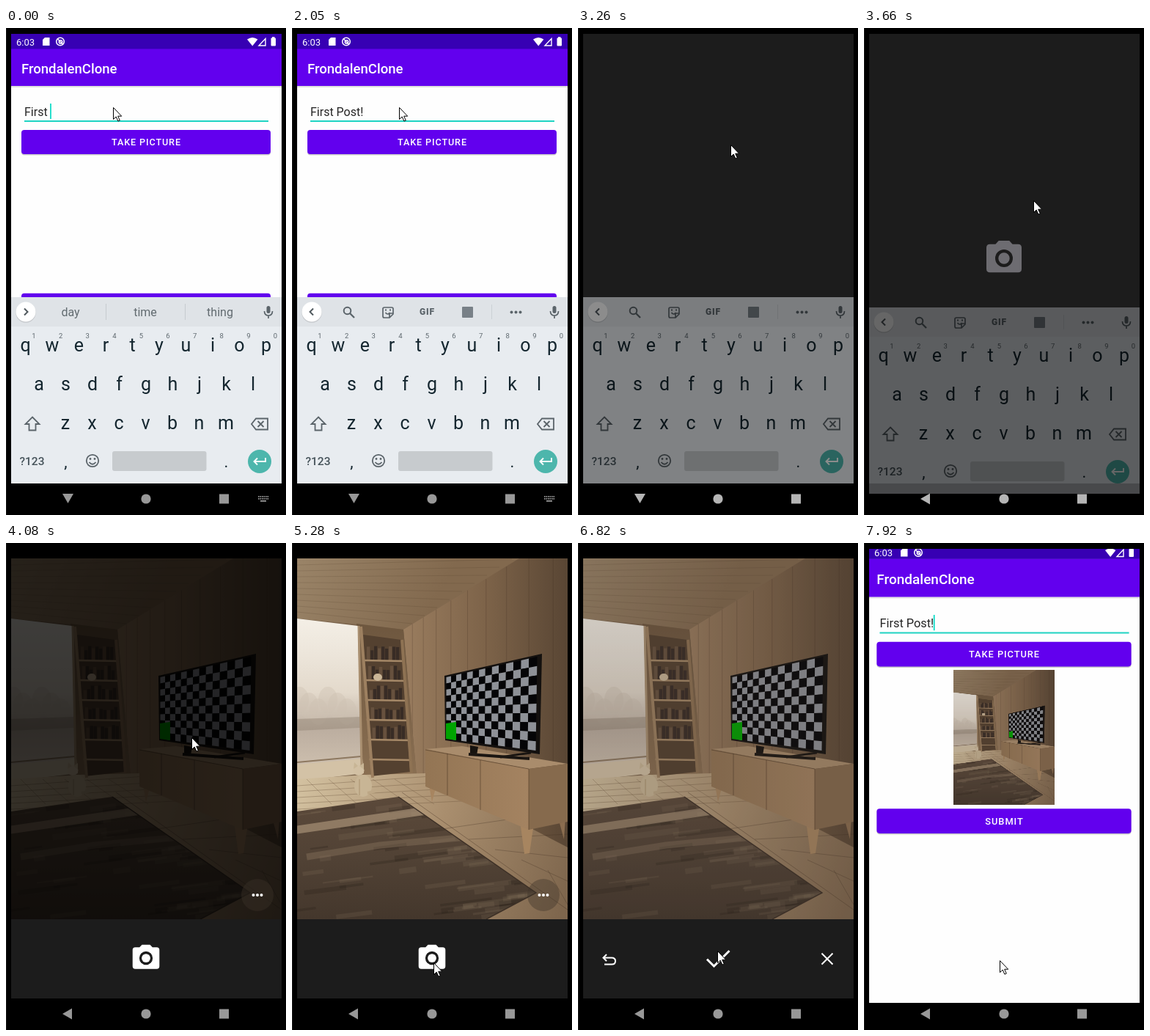
Write an HTML page with a canvas that moves like this. It is 382x664 px and loops after 8 s.

```html
<!DOCTYPE html>
<html>
<head>
<meta charset="utf-8">
<style>
html, body { margin: 0; width: 100%; height: 100%; overflow: hidden; background: #000 }
canvas { display: block }
</style>
</head>
<body>
<canvas id="stage" width="382" height="664"></canvas>
<script>
const stage = document.getElementById('stage').getContext('2d');
let c = stage;

// ---------- helpers ----------
function fill(d, color) { c.fillStyle = color; c.fill(new Path2D(d)); }
function poly(points, color) { fill('M' + points + 'z', color); }
function line(d, color, width = 1) {
  c.strokeStyle = color;
  c.lineWidth = width;
  c.stroke(new Path2D(d));
}
function rect(x, y, w, h, color, r = 0) {
  c.fillStyle = color;
  c.beginPath();
  c.roundRect(x, y, w, h, r);
  c.fill();
}
function disc(x, y, r, color, ry = r) {
  c.fillStyle = color;
  c.beginPath();
  c.ellipse(x, y, r, ry, 0, 0, 7);
  c.fill();
}
function ring(x, y, r, color, width) {
  c.strokeStyle = color;
  c.lineWidth = width;
  c.beginPath();
  c.arc(x, y, r, 0, 7);
  c.stroke();
}
function text(s, x, y, size, color, align = 'center', weight = 400, spacing = 0) {
  c.font = `${weight} ${size}px Roboto, sans-serif`;
  c.letterSpacing = spacing + 'px';
  c.textAlign = align;
  c.fillStyle = color;
  c.fillText(s, x, y);
}
function shade(x0, y0, x1, y1, ...colors) {
  const g = c.createLinearGradient(x0, y0, x1, y1);
  colors.forEach((color, i) => g.addColorStop(i / (colors.length - 1), color));
  return g;
}
function group(fn, { scale = 1, dy = 0, alpha = 1, clip } = {}) {
  c.save();
  c.globalAlpha *= alpha;
  if (clip) c.clip(new Path2D(clip));
  c.translate(191, 340 + dy);
  c.scale(scale, scale);
  c.translate(-191, -340);
  fn();
  c.restore();
}
// linear interpolation through rows of [time, ...values]
function track(rows, t) {
  const i = rows.findLastIndex(r => r[0] <= t), a = rows[i], b = rows[i + 1] || a;
  const k = a === b ? 0 : (t - a[0]) / (b[0] - a[0]);
  return a.slice(1).map((v, j) => v + (b[j + 1] - v) * k);
}
let seed = 7;
const random = () => (seed = seed * 16807 % 2147483647) / 2147483647;

// ---------- room seen by the camera ----------
function paintRoom() {
  rect(7, 21, 369, 492, '#7a634b');
  poly('7,21 310,21 152,118 90,111 7,103', shade(7, 21, 180, 110, '#9a8468', '#82694e'));
  for (let i = 0; i < 9; i++)
    line(`M7,${30 + i * 8}L${300 - i * 17},${22 + i * 11}`, 'rgba(70,52,36,.16)');
  poly('152,118 310,21 376,21 376,440 170,318', shade(152, 0, 376, 0, '#9a7d5f', '#7d6349', '#594634'));
  for (let i = 1; i < 10; i++) {
    const x = 152 + i * i * 1.3 + i * 11;
    line(`M${x},${118 - (x - 152) * .61}V330`, 'rgba(55,40,27,.22)');
  }
  poly('88,110 152,118 170,318 95,325', shade(0, 110, 0, 320, '#6e573f', '#8a6f52'));

  // window
  poly('7,103 90,113 94,305 7,312', shade(0, 103, 0, 305, '#f4efe6', '#ece5da', '#e3d9cb', '#bcaea0', '#cdbfae'));
  for (let i = 0; i < 6; i++) disc(10 + i * 13, 214 + i % 3 * 8, 13, 'rgba(205,192,177,.4)', 18);
  poly('7,240 92,237 93,252 7,256', 'rgba(150,135,120,.5)');
  line('M7,299L94,291', '#8d7860', 2);
  poly('7,302 96,294 98,314 7,325', '#d3c2a6');
  line('M91,113L95,305', '#a98f70', 3);

  // floor
  poly('7,322 100,316 182,314 376,415 376,513 7,513', shade(7, 340, 376, 480, '#d2c09f', '#a98e6e', '#7e664d'));
  for (let i = 0; i < 5; i++) {
    line(`M7,${331 + i * 8}L${190 + i * 20},${318 + i * 8}`, 'rgba(100,78,55,.35)');
    line(`M${20 + i * 30},322l${34 + i * 5},34`, 'rgba(100,78,55,.3)');
    line(`M${205 + i * 36},${390 + i * 14}L376,${365 + i * 32}`, 'rgba(60,43,30,.3)');
  }
  line('M150,340L376,500', 'rgba(70,50,35,.4)');

  // rug
  c.save();
  c.clip(new Path2D('M7,366L145,346 333,477 265,513H7z'));
  rect(7, 340, 330, 175, shade(0, 346, 0, 513, '#5b493a', '#514235', '#44372c'));
  for (let i = 0; i < 90; i++) {
    const x = random() * 320, y = 350 + random() * 165, w = 15 + random() * 60;
    line(`M${x},${y}l${w},${-w * .13}`, i % 3 ? 'rgba(145,122,98,.16)' : 'rgba(38,29,22,.25)', 2 + random() * 6);
  }
  line('M0,392L75,381 190,364', 'rgba(190,167,136,.55)', 11);
  line('M20,428L120,412 250,400', 'rgba(160,137,110,.3)', 9);
  c.restore();
  line('M145,346L333,477 265,513', '#3d3026', 1.5);

  // ladder shelf
  poly('97,125 149,132 161,312 108,318', '#544130');
  for (let i = 0; i < 6; i++) {
    const y = 160 + i * 27, x = 99 + i * 1.9;
    for (let b = 0; b < 9 && i < 5; b++) {
      const h = 13 + random() * 7;
      rect(x + 3 + b * 5, y - h, 4.3, h, b % 3 ? '#382c25' : '#67513e');
    }
    line(`M${x - 3},${y}L${x + 54},${y + 1}`, '#a58867', 2.5);
  }
  disc(117, 183, 6, '#c9b597', 5);
  line('M94,114L110,320', '#9d8060', 4);
  line('M150,132L163,314', '#8e7253', 4);

  // cat
  disc(97, 331, 12, '#c8b595', 15);
  disc(91, 310, 7.5, '#d2c0a3', 7);
  poly('84,308 85,299 90,304', '#c8b595');
  poly('92,304 98,300 98,309', '#c8b595');
  line('M103,341Q114,339 121,334', '#bda786', 4);
  line('M92,322V344', '#a9916f');

  // sideboard
  poly('187,330 196,334 191,353', '#a78560');
  poly('312,386 329,389 324,423 317,424', '#a78560');
  poly('364,378 373,376 371,404', '#8b6d4f');
  poly('182,281 232,277 376,301 323,308', '#a98c6c');
  poly('182,281 323,308 323,391 182,332', shade(182, 0, 323, 0, '#937554', '#a48361'));
  poly('323,308 376,301 376,380 323,391', '#866a4d');
  line('M212,287V344M257,296V364M182,282L323,308V391', 'rgba(65,46,30,.5)');

  // television
  poly('243,276 254,278 252,289 243,287', '#17130f');
  line('M241,288L324,294', '#1b1612', 4);
  line('M284,292L326,286', '#1b1612', 3);
  poly('208,181 341,151 338,288 209,269', '#14110f');
  const at = (u, v) => {
    const w = .72 * u + .28 * u * u, top = 183 - 28 * w, bottom = 267 + 16 * w;
    return `${210.5 + 124 * w - 2 * w * v},${top + (bottom - top) * v} `;
  };
  const cols = 14, rows = 10;
  for (let i = 0; i < cols; i++)
    for (let j = 0; j < rows; j++) {
      const u = i / cols, v = j / rows, u2 = (i + 1) / cols, v2 = (j + 1) / rows;
      poly(at(u, v) + at(u2, v) + at(u2, v2) + at(u, v2), (i + j) % 2 ? '#050507' : '#8e9197');
    }
  poly('210,246 224,244 224,269 210,267', '#00a400');
}
const room = document.createElement('canvas');
room.width = 369;
room.height = 492;
c = room.getContext('2d');
c.translate(-7, -21);
paintRoom();
c = stage;

function photo(x, y, w, h, veil) {
  c.drawImage(room, x, y, w, h);
  rect(x, y, w, h, `rgba(62,54,48,${veil})`);
}

// ---------- app ----------
function button(label, y, pressed) {
  rect(21, y + 1, 340, 33.5, 'rgba(0,0,0,.2)', 4);
  rect(21, y, 340, 33, '#6200ee', 4);
  if (pressed) group(() => disc(196, 159, 145, 'rgba(255,255,255,.22)'), { clip: `M21,${y}h340v33h-340z` });
  text(label, 191.5, y + 21, 12.6, '#fff', 'center', 500, .9);
}
function app({ entry = 'First Post!', caret = false, pressed = false, picture = false }) {
  rect(7, 8, 369, 613, '#fefefe');
  rect(7, 79, 369, 2, 'rgba(0,0,0,.12)');
  rect(7, 28, 369, 51, '#6200ee');
  rect(7, 8, 369, 20.5, '#3700b3');
  text('FrondalenClone', 21, 61.5, 18.6, '#fff', 'left', 500);
  text(entry, 25, 120, 16, '#252525', 'left');
  if (caret) rect(25 + c.measureText(entry).width - .5, 103, 1.7, 21, '#03dac5');
  rect(25, 126, 333, 2, '#1fd3c3');
  button('TAKE PICTURE', 139, pressed);
  if (picture) photo(123.5, 176.5, 135, 180, .16);
  button('SUBMIT', 361.7);
}
function statusBar(y) {
  text('6:03', 14, y + 5, 13, '#fff', 'left');
  fill(`M53,${y - 5.5}h6.5v11h-9.5v-8z`, '#fff');
  ring(74, y, 5.3, '#fff', 1.5);
  ring(74.5, y + .5, 2.2, '#fff', 1.5);
  line(`M70,${y - 4}l8,8`, '#fff', 1.5);
  fill(`M329,${y - 3}q7.2,-5 14.4,0l-7.2,9z`, '#fff');
  line(`M354,${y - 4}v9.5h-9z`, '#fff', 1.4);
  rect(361.5, y - 5, 6.5, 11, '#fff', 1);
  rect(363, y - 6.3, 3.5, 2, '#fff');
}

// ---------- keyboard ----------
const INK = '#5b646a';
function suggestions(words) {
  words.forEach((word, i) => text(word, 88 + i * 102, 393, 16, '#626b70'));
  line('M136.5,376v22M244.5,376v22', '#c6cbcf');
}
function tools() {
  ring(75.5, 385.5, 4.8, INK, 2);
  line('M79,389l6,6', INK, 2.3);
  line('M126,381h10q2,0 2,2v7l-5,5h-7q-2,0 -2,-2v-10q0,-2 2,-2M138,389h-5v6M127.500,388q3,4 6,0', INK, 1.7);
  rect(127, 383.500, 2, 2, INK);
  rect(133, 383.500, 2, 2, INK);
  text('GIF', 184.5, 391, 12, INK, 'center', 900, .9);
  rect(232, 380, 15, 15, '#788087', 1);
  line('M272.5,377v20', '#ccd1d5');
  [299.5, 305.5, 311.5].forEach(x => disc(x, 387.5, 2, INK));
}
function keyboard(words, toolAlpha) {
  rect(7, 367, 369, 254, '#e8ecf0');
  rect(7, 367, 369, 40, '#dfe3e7');
  disc(27, 388, 13.7, 'rgba(0,0,0,.13)');
  disc(27, 387, 13.5, '#fff');
  line(toolAlpha ? 'M29,382.500l-4.500,4.500 4.500,4.500' : 'M25,382.500l4.500,4.500 -4.500,4.500', '#50595e', 2);
  if (toolAlpha) group(tools, { alpha: toolAlpha });
  else suggestions(words);
  rect(355.5, 379, 5, 10, INK, 2.5);
  line('M352.500,386q0,6 5.500,6t5.500,-6M358,392v4', INK, 1.7);

  const row = (keys, x, y) => [...keys].forEach((k, i) => text(k, x + i * 36.5, y, 25, '#14262f'));
  row('qwertyuiop', 26.5, 441);
  row('asdfghjkl', 45, 494);
  row('zxcvbnm', 81, 547);
  [...'1234567890'].forEach((n, i) => text(n, 38 + i * 36.6, 423, 9.5, '#5e686e'));
  line('M36,530.500l9.500,9.500h-5v8.500h-9v-8.500h-5z', INK, 1.8);
  line('M341,532.500h16v15h-16l-6,-7.500zM343.500,536l8,8M351.500,536l-8,8', INK, 1.8);
  text('?123', 35.5, 596, 15.5, '#46535a', 'center', 500);
  text(',', 81.5, 599, 22, '#14262f');
  text('.', 300.5, 599, 22, '#14262f');
  ring(118, 590, 8.2, INK, 1.8);
  disc(115, 587.5, 1.4, INK);
  disc(121, 587.5, 1.4, INK);
  line('M113.500,592q4.500,5.500 9,0', INK, 1.8);
  rect(145, 577, 128.5, 27, '#c7cbce', 3);
  disc(346, 591, 16, '#4db6ac');
  line('M354,586v5h-15M343,586.500l-4.500,4.500 4.500,4.500', '#fff', 1.9);
}

// ---------- camera ----------
const DARK = '#1c1c1c';
function cameraIcon(y, k, color) {
  c.save();
  c.translate(191, y);
  c.scale(k, k);
  fill('M-3,-10L-4.830,-8H-8q-2,0 -2,2V6q0,2 2,2H8q2,0 2,-2V-6q0,-2 -2,-2H4.830L3,-10z', color);
  disc(0, 0, 5, DARK);
  disc(0, 0, 3.2, color);
  c.restore();
}
function reviewIcons() {
  line('M39,561l-4.500,4.500 4.500,4.500M35,565.500h11q5,0 5,4.500t-5,4.500h-10', '#fff', 2);
  line('M176,567.500l9.500,9.500 21,-21', '#fff', 3);
  line('M332.500,559.500l15,15M347.500,559.500l-15,15', '#fff', 2);
}
function camera(t) {
  const [preview, shutter, review] = track(
    [[4080, .25, 1, 0], [4470, 1, 1, 0], [5700, 1, 1, 0], [6070, 1, 0, 0], [6220, 1, 0, .3], [6460, 1, 0, 1]], t);
  rect(7, 8, 369, 613, '#000');
  rect(7, 513, 369, 108, DARK);
  group(() => photo(7, 21, 369, 492, .2 * (1 - shutter)), { alpha: preview });
  if (shutter) group(() => {
    cameraIcon(566, 1.83, '#fff');
    disc(343, 480, 22, 'rgba(60,50,42,.4)');
    [337.5, 343, 348.5].forEach(x => disc(x, 480, 2, '#fff'));
  }, { alpha: shutter });
  if (review) group(reviewIcons, { alpha: review });
}
function openCamera(t, keys) {
  const [scale, size, dim, dy] = track(
    [[2990, 1.0456, .984, .2, 0], [3110, 1.046, 1, .35, 0], [3260, 1, 1, .45, 0],
     [3410, 1, 1, .52, 6], [3660, 1, 1, .6, 14], [3810, 1, 1, .82, 22]], t);
  group(() => app({}), { scale });
  rect(7, 8, 369, 626, 'rgba(0,0,0,.3)');
  group(() => rect(7, 8, 369, t < 3260 ? 626 : 613, DARK), { scale: size });
  if (t < 3260) statusBar(18.5);
  if (t >= 3410) cameraIcon(314, 2.4, '#6d6c71');
  if (t < 3930) group(() => {
    keys();
    rect(7, 367, 369, 254, `rgba(0,0,0,${dim})`);
  }, { scale, dy });
  if (t >= 3410) rect(7, 621, 369, 43, 'rgba(0,0,0,.22)');
}

// ---------- system ----------
function navBar(t) {
  const gray = t > 2900 && t < 4080 ? '#b5b5b5' : '#989898';
  if (t < 3410) poly('77,635 92,635 84.5,648', gray);
  else poly('77,642 90,634.5 90,649.5', gray);
  disc(191, 642, 6.6, gray);
  rect(291, 635.5, 13, 13, gray);
  if (t < 3260)
    for (let i = 0; i < 13; i++)
      i < 12 ? rect(344 + i % 6 * 2.5, 638 + (i / 6 | 0) * 3, 1.6, 1.8, gray) : rect(347, 644, 8, 1.8, gray);
}
const MOUSE = [
  [0, 146, 108], [2050, 146, 108], [2170, 257, 154], [2320, 240, 160], [2440, 220, 162], [2560, 208, 159],
  [3410, 208, 159], [3660, 231, 235], [3930, 253, 265], [4470, 253, 265], [4620, 222, 544],
  [4770, 216, 510], [4890, 208, 480], [5010, 198, 545], [5130, 193, 572], [6220, 193, 572],
  [6820, 190, 556], [7090, 181, 570], [7335, 181, 570], [7340, 184, 570], [7645, 184, 570], [7650, 185, 569]
];
function pointer(t) {
  const [x, y] = track(MOUSE, t);
  const arrow = `M${x + .5},${y + .5}v16l3.700,-3.500 2.700,6 2.400,-1 -2.600,-5.800h5z`;
  fill(arrow, '#fff');
  line(arrow, '#000');
}

function draw(t) {
  rect(0, 0, 382, 664, '#000');
  rect(0, 0, 1, 664, '#141414');
  const typed = t < 120 ? 0 : t < 390 ? 1 : t < 510 ? 2 : t < 660 ? 3 : t < 1620 ? 4 : 5;
  const words = t < 390 ? ['day', 'time', 'thing'] : t < 660 ? ['Pop', 'Post', 'Pot'] : ['Post', 'Posts', 'Posting'];
  const keys = () => keyboard(words, t < 1620 ? 0 : t < 1740 ? .5 : 1);
  const screen = bottom => `M7,8H376V${bottom}H7z`;
  if (t < 2990) {
    const caret = t < 1190 || t >= 1620 && t < 2050 || t >= 2560;
    app({ entry: 'First ' + 'Post!'.slice(0, typed), caret, pressed: t >= 2840 });
    statusBar(18.5);
    keys();
  } else if (t < 4080) {
    group(() => openCamera(t, keys), { clip: screen(650) });
  } else if (t < 7800) {
    camera(t);
  } else {
    const [scale, y, alpha] = track([[7800, 1.07, 9, .5], [7920, 1.0215, 13, 0]], t);
    group(() => {
      group(() => app({ caret: true, picture: true }), { scale });
      statusBar(y);
      if (alpha) group(() => camera(t), { scale: .94, alpha });
    }, { clip: screen(627.5) });
  }
  navBar(t);
  pointer(t);
}

const STEPS = [
  0, 120, 240, 390, 510, 660, 1190, 1620, 1740, 2050, 2170, 2320, 2440, 2560, 2840, 2990, 3110, 3260,
  3410, 3660, 3810, 3930, 4080, 4230, 4350, 4470, 4620, 4770, 4890, 5010, 5130, 5280, 5710, 5830, 5950,
  6070, 6220, 6340, 6460, 6580, 6700, 6820, 6970, 7090, 7340, 7650, 7800, 7920
];
let shown;
function tick() {
  const now = performance.now() % 8000, step = STEPS.findLast(s => s <= now);
  if (step !== shown) draw(shown = step);
  requestAnimationFrame(tick);
}
tick();
</script>
</body>
</html>
```
